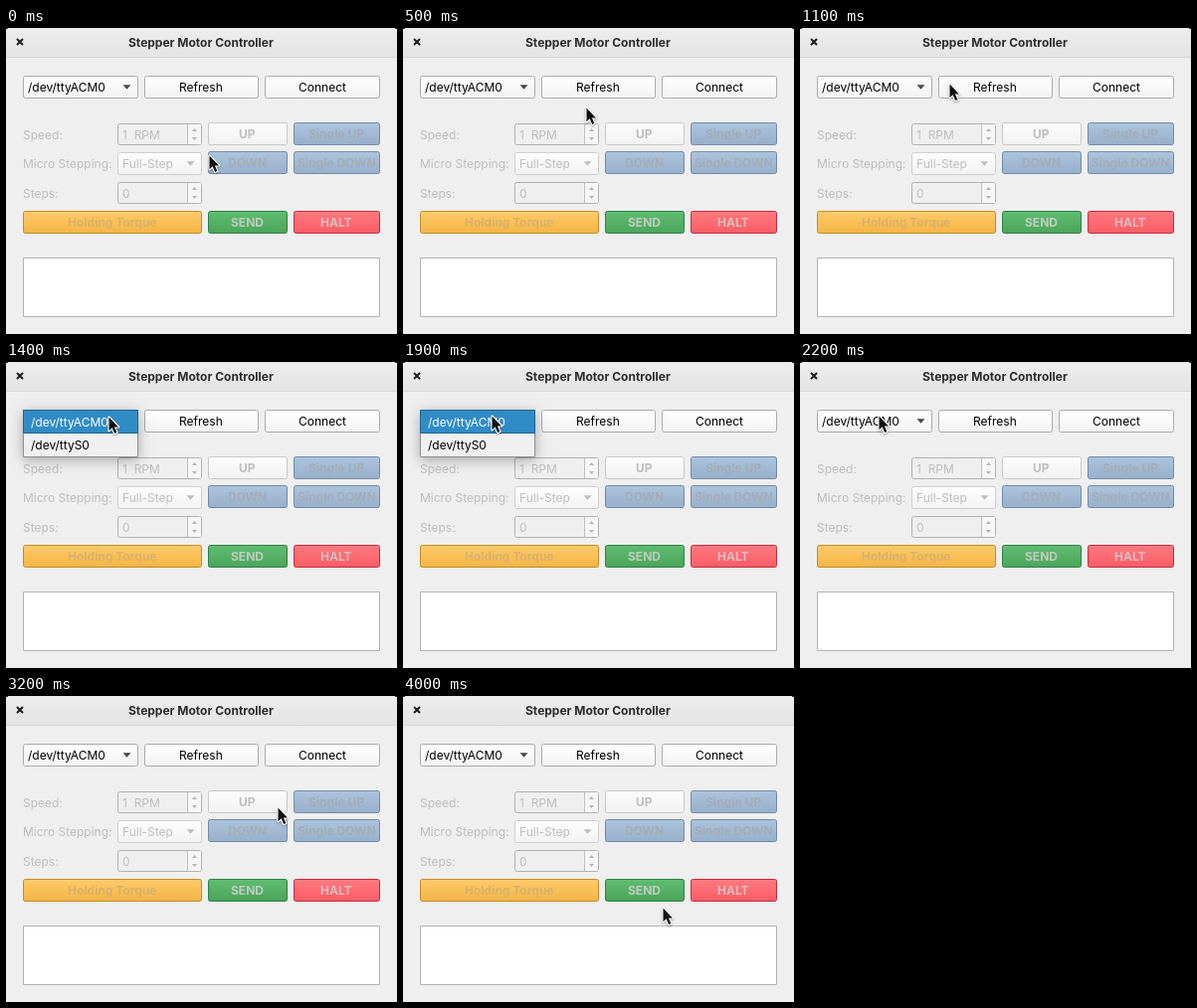
Write an HTML page with a canvas that moves like this. It is 393 px wide and 308 px high and loops after 8000 ms.

```html
<!DOCTYPE html>
<html lang="en">
<head>
<meta charset="utf-8">
<title>Stepper Motor Controller</title>
<style>
  html, body { margin: 0; width: 100%; height: 100%; overflow: hidden; background: #efefef; }
  canvas { display: block; }
</style>
</head>
<body>
<canvas id="stage" width="393" height="308"></canvas>
<script>
const ctx = document.getElementById('stage').getContext('2d');
const LOOP = 8000, STEP = 100, ROW = 23;

// Pointer tip: time, x, y
const path = [
  [100, 204, 128], [700, 174, 56], [1000, 174, 56], [1300, 103, 55],
  [1500, 103, 55], [2200, 79, 54], [2400, 320, 60], [2600, 320, 60],
  [2800, 304, 60], [3200, 273, 112], [3300, 273, 181], [3600, 265, 211],
  [3800, 265, 211], [4000, 261, 213]
];

function pointerAt(t) {
  const i = path.findIndex(p => p[0] >= t);
  if (i === 0) return path[0].slice(1);
  if (i < 0) return path[path.length - 1].slice(1);
  const [t0, x0, y0] = path[i - 1], [t1, x1, y1] = path[i];
  const k = (t - t0) / (t1 - t0);
  return [Math.round(x0 + (x1 - x0) * k), Math.round(y0 + (y1 - y0) * k)];
}

const within = (t, from, to) => t >= from && t < to;

function text(str, x, y, color = '#000', weight = 400, centered = false) {
  ctx.font = `${weight} 12px Inter, "Liberation Sans", sans-serif`;
  ctx.fillStyle = color;
  // Whole-pixel start, as the toolkit lays out its labels
  const left = centered ? Math.floor(x - ctx.measureText(str).width / 2) : x;
  ctx.fillText(str, left, y);
}

function fade(y, h, top, bottom) {
  const g = ctx.createLinearGradient(0, y, 0, y + h);
  g.addColorStop(0, top);
  g.addColorStop(1, bottom);
  return g;
}

function box(x, y, w, h, fill, border, r = 2) {
  ctx.beginPath();
  ctx.roundRect(x + 0.5, y + 0.5, w - 1, h - 1, r);
  ctx.fillStyle = fill;
  ctx.fill();
  ctx.strokeStyle = border;
  ctx.lineWidth = 1;
  ctx.stroke();
}

// Top, bottom, border, label colour, label weight
const skins = {
  plain: ['#ffffff', '#f2f2f2', '#ababab', '#000', 400],
  down: ['#d9d9d9', '#dcdcdc', '#ababab', '#000', 400],
  off: ['#fdfdfd', '#f1f1f1', '#c8c8c8', '#bebebe', 700],
  blue: ['#adc4dc', '#97afca', '#6f8bab', '#a2adb8', 700],
  orange: ['#ffcb6b', '#f3b444', '#c48c28', '#dab168', 700],
  green: ['#5fbd70', '#4ba45b', '#2f8042', '#c0cbc1', 700],
  red: ['#ff7a80', '#fb5c66', '#c22c3c', '#d8bdbf', 700]
};

function button(x, y, w, label, skin) {
  const [top, bottom, border, color, weight] = skins[skin];
  box(x, y, w, ROW, fade(y, ROW, top, bottom), border);
  text(label, x + w / 2, y + 16, color, weight, true);
}

function arrow(x, y, w, h, color) {
  ctx.beginPath();
  ctx.moveTo(x - w / 2, y - h / 2);
  ctx.lineTo(x + w / 2, y - h / 2);
  ctx.lineTo(x, y + h / 2);
  ctx.fillStyle = color;
  ctx.fill();
}

function combo(x, y, w, label, border, color, arrowColor) {
  box(x, y, w, ROW, fade(y, ROW, '#fefefe', '#f2f2f2'), border);
  text(label, x + 5, y + 16, color);
  arrow(x + w - 11.5, y + 11.5, 8, 4.5, arrowColor);
}

function spin(y, label) {
  box(112, y, 85, 22, '#efefef', '#b2b2b2');
  ctx.fillStyle = '#f6f6f6';
  ctx.fillRect(183, y + 1, 13, 20);
  ctx.fillStyle = '#c0c0c0';
  ctx.fillRect(182, y + 1, 1, 20);
  arrow(189.5, y + 6.5, 5, -3, '#b4b4b4');
  arrow(189.5, y + 15.5, 5, 3, '#b4b4b4');
  text(label, 117, y + 16, '#bebebe');
}

function titleBar() {
  ctx.fillStyle = fade(0, 29, '#ededed', '#e4e4e4');
  ctx.fillRect(0, 0, 393, 29);
  ctx.fillStyle = '#d6d6d6';
  ctx.fillRect(0, 29, 393, 1);
  ctx.fillStyle = '#333';
  ctx.fillRect(0, 0, 2, 1);
  ctx.fillRect(391, 0, 2, 1);
  ctx.strokeStyle = '#1c1c1c';
  ctx.lineWidth = 2;
  ctx.beginPath();
  ctx.moveTo(11, 11);
  ctx.lineTo(17, 17);
  ctx.moveTo(17, 11);
  ctx.lineTo(11, 17);
  ctx.stroke();
  text('Stepper Motor Controller', 196.5, 19, '#2c2c2c', 700, true);
}

function popup() {
  ctx.save();
  ctx.shadowColor = 'rgba(0,0,0,.3)';
  ctx.shadowBlur = 12;
  ctx.shadowOffsetY = 3;
  ctx.fillStyle = '#f0f0f0';
  ctx.fillRect(17, 48, 116, 48);
  ctx.restore();
  box(17, 48, 116, 48, '#f0f0f0', '#8f8f8f', 0);
  box(17, 48, 116, 24, '#308cc6', '#22648e', 0);
  text('/dev/ttyACM0', 25, 65, '#fff');
  text('/dev/ttyS0', 25, 88);
}

const pointer = new Path2D('M.5 .5V14.2L3.6 11.3L6.2 17L8.4 16L5.9 10.4H10Z');

function drawPointer(x, y) {
  ctx.save();
  ctx.translate(x, y);
  ctx.lineJoin = 'round';
  ctx.lineWidth = 2.4;
  ctx.strokeStyle = '#fff';
  ctx.shadowColor = 'rgba(0,0,0,.35)';
  ctx.shadowBlur = 2;
  ctx.shadowOffsetY = 1;
  ctx.stroke(pointer);
  ctx.shadowColor = 'transparent';
  ctx.fillStyle = '#111';
  ctx.fill(pointer);
  ctx.restore();
}

function draw(t) {
  ctx.fillStyle = '#efefef';
  ctx.fillRect(0, 0, 393, 308);
  titleBar();

  combo(17, 48, 116, '/dev/ttyACM0', '#ababab', '#000', '#484848');
  button(139, 48, 115, 'Refresh', within(t, 800, 900) ? 'down' : 'plain');
  button(260, 48, 116, 'Connect', within(t, 2500, 2600) ? 'down' : 'plain');

  text('Speed:', 17, 112, '#bebebe');
  text('Micro Stepping:', 17, 141, '#bebebe');
  text('Steps:', 17, 171, '#bebebe');
  spin(96, '1  RPM');
  combo(112, 125, 85, 'Full-Step', '#cfcfcf', '#bebebe', '#bebebe');
  spin(155, '0');

  button(203, 95, 80, 'UP', 'off');
  button(289, 95, 87, 'Single UP', 'blue');
  button(203, 124, 80, 'DOWN', 'blue');
  button(289, 124, 87, 'Single DOWN', 'blue');
  button(17, 184, 180, 'Holding Torque', 'orange');
  button(203, 184, 80, 'SEND', 'green');
  button(289, 184, 87, 'HALT', 'red');

  box(17, 231, 359, 60, '#fff', '#b4b4b4', 0);

  if (within(t, 1400, 2000)) popup();
  drawPointer(...pointerAt(t));
}

const start = performance.now();

function tick() {
  const t = (performance.now() - start) % LOOP;
  draw(Math.floor(t / STEP) * STEP);
  requestAnimationFrame(tick);
}
tick();
</script>
</body>
</html>
```
